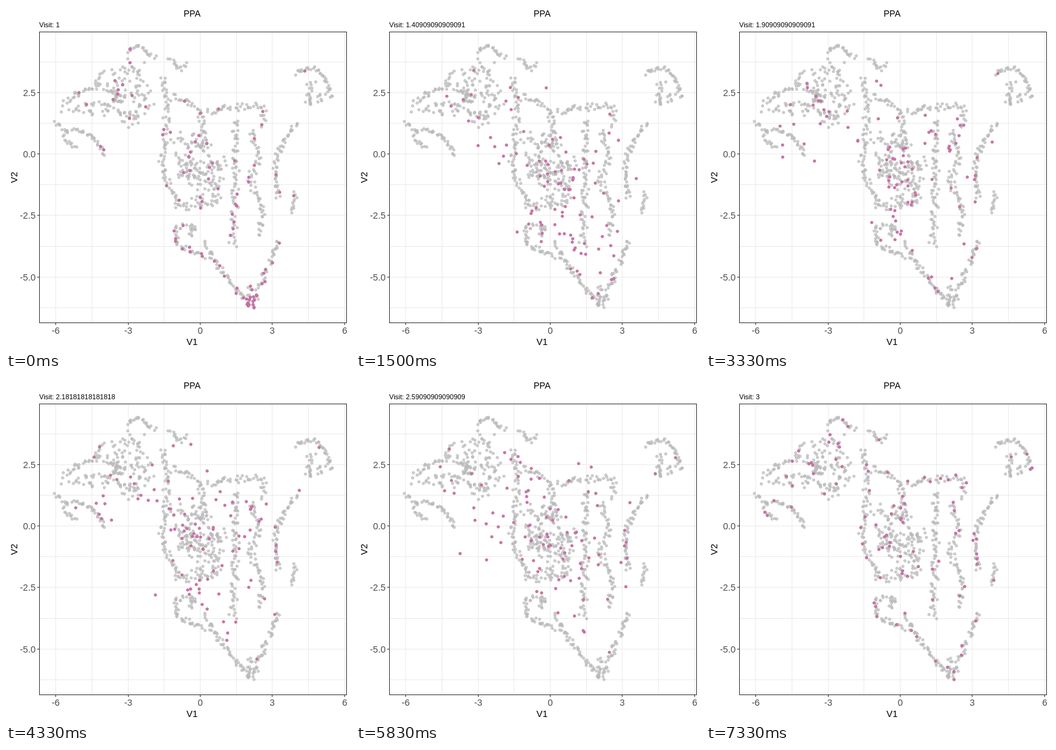
An HTML page that plays this animation: 550 by 550 pixels, repeating every 10 s.

```html
<!DOCTYPE html>
<html lang="en">
<head>
<meta charset="utf-8">
<title>PPA</title>
<style>
  html, body { margin: 0; width: 100%; height: 100%; overflow: hidden; background: #fff; }
  svg { display: block; width: 100%; height: 100%; font-family: "Liberation Sans", Arial, sans-serif; }
  .grid { stroke: #ebebeb; }
  .tick, .frame { stroke: #333; fill: none; }
  .label { font-size: 14.67px; fill: #4d4d4d; }
  .axis { font-size: 14.67px; }
  .cloud { fill: #bebebe; fill-opacity: .75; stroke: #b2b2b2; stroke-opacity: .6; stroke-width: .9; }
  .moving { fill: #cc74a8; stroke: #bf6a9c; stroke-width: .8; }
</style>
</head>
<body>
<svg viewBox="0 0 550 550">
  <g id="axes"></g>
  <g id="cloud" class="cloud"></g>
  <g id="moving" class="moving"></g>
  <rect class="frame" x="53.5" y="41.5" width="491" height="465"/>
  <text x="297.5" y="17" font-size="14" text-anchor="middle">PPA</text>
  <text id="visit" x="53" y="34" font-size="11"></text>
  <text class="axis" x="297.5" y="542" text-anchor="middle">V1</text>
  <text class="axis" transform="translate(18 274) rotate(-90)" text-anchor="middle">V2</text>
</svg>
<script>
const STEP = 1000 / 6, LOOP = 10000, STEPS_PER_VISIT = 22, TRACKS = 95;
const ROUNDING = 4; // frame times are rounded to 10 ms
const byId = id => document.getElementById(id);

let seed = 2024;
function random() {
  seed = (seed * 1664525 + 1013904223) % 4294967296;
  return seed / 4294967296;
}
const jitter = spread => (random() + random() - 1) * spread * 1.3;

function add(parent, tag, attributes, text = '') {
  const node = document.createElementNS('http://www.w3.org/2000/svg', tag);
  for (const name in attributes) node.setAttribute(name, attributes[name]);
  node.textContent = text;
  return parent.appendChild(node);
}
const dot = (parent, [x, y]) => add(parent, 'circle', { cx: x, cy: y, r: 2.15 });

// The cloud is sprayed along a skeleton: thin edges, bands and wide areas.
const brushes = [
  { spread: 4, density: 0.38, path: `
    M192 75Q205 58 226 72L238 84 M262 84L277 101L290 94
    M78 186L95 200V215L112 224 M104 196L135 206L160 239
    M464 110Q480 88 503 108L521 138 M462 300L458 330
    M466 187Q440 215 434 240T436 310 M270 352L273 382L318 402
    M318 378L337 415L390 478` },
  { spread: 6, density: 0.36, path: `
    M93 164Q100 135 145 132L154 106 M250 112L258 150V200L248 245L262 290L280 315
    M268 145L290 150L315 175V230 M270 315Q300 330 345 305
    M318 172Q335 160 410 162V190 M370 180L362 383
    M392 197L405 240L390 280L410 320L404 366 M521 138L480 156L490 118
    M277 356L302 350L295 372 M438 373L392 482L388 445` },
  { spread: 13, density: 0.42, path: `
    M105 158L165 165L180 110L205 95L213 145L165 135L198 190L230 140
    M265 215L325 217L275 250L350 255L275 270L345 285L300 310` }
];

function spray({ spread, density, path }) {
  const curve = document.createElementNS('http://www.w3.org/2000/svg', 'path');
  curve.setAttribute('d', path);
  const length = curve.getTotalLength(), count = Math.round(length * density);
  return Array.from({ length: count }, (_, i) => {
    const { x, y } = curve.getPointAtLength((i + random()) / count * length);
    return [x + jitter(spread), y + jitter(spread)];
  });
}

const cloud = brushes.flatMap(spray).sort((a, b) => b[1] - a[1]);
const pick = u => cloud[Math.floor(u * cloud.length)];
const spreadOut = (i, ratio) => (i + 0.5) * ratio % 1;

// First visits crowd near the bottom tip, last visits cover the cloud evenly,
// and the visit between lies on the side nearer to both.
const tracks = Array.from({ length: TRACKS }, (_, i) => {
  const start = pick(spreadOut(i, 0.618034) ** 2.3);
  const end = pick(spreadOut(i, 0.569840));
  const detour = p => Math.hypot(p[0] - start[0], p[1] - start[1]) + Math.hypot(p[0] - end[0], p[1] - end[1]);
  const [a, b] = [pick(random()), pick(random())];
  return [start, detour(a) < detour(b) ? a : b, end];
});

function drawAxes() {
  const axes = byId('axes');
  const line = (kind, x1, y1, x2, y2) => add(axes, 'line', { class: kind, x1, y1, x2, y2 });
  const toX = v => Math.round(310 + 38.45 * v) + 0.5;
  const toY = v => Math.round(236.15 - 39.3 * v) + 0.5;
  for (let v = -6; v <= 6; v += 1.5) {
    const x = toX(v);
    line('grid', x, 42, x, 506);
    if (v % 3) continue;
    line('tick', x, 507, x, 510);
    add(axes, 'text', { class: 'label', x, y: 524, 'text-anchor': 'middle' }, v);
  }
  for (let v = -6.25; v <= 3.75; v += 1.25) {
    const y = toY(v);
    line('grid', 54, y, 544, y);
    if (v % 2.5) continue;
    line('tick', 50, y, 53, y);
    add(axes, 'text', { class: 'label', x: 47.5, y: y + 5.5, 'text-anchor': 'end' }, v.toFixed(1));
  }
}

drawAxes();
cloud.forEach(point => dot(byId('cloud'), point));
const dots = tracks.map(track => dot(byId('moving'), track[0]));

let shown = -1;
function render(now) {
  const step = Math.min(2 * STEPS_PER_VISIT, Math.floor((now % LOOP + ROUNDING) / STEP));
  if (step !== shown) {
    shown = step;
    const progress = step / STEPS_PER_VISIT, leg = Math.min(1, Math.floor(progress)), u = progress - leg;
    byId('visit').textContent = 'Visit: ' + Number((1 + progress).toPrecision(15));
    tracks.forEach((track, i) => {
      const [x0, y0] = track[leg], [x1, y1] = track[leg + 1];
      dots[i].setAttribute('cx', x0 + (x1 - x0) * u);
      dots[i].setAttribute('cy', y0 + (y1 - y0) * u);
    });
  }
  requestAnimationFrame(() => render(performance.now()));
}
render(0);
</script>
</body>
</html>
```
